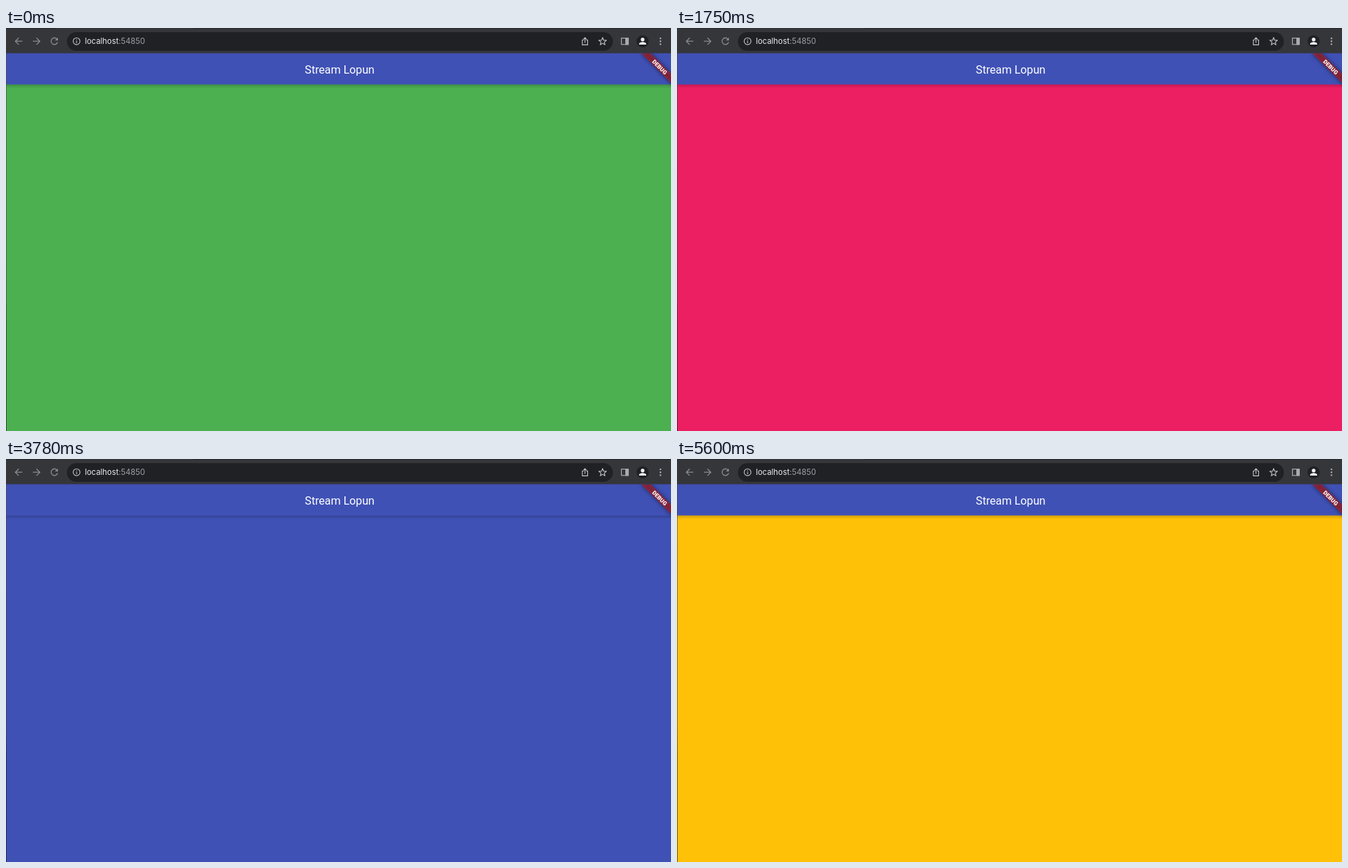
Write an HTML page that moves like this. It is 961 px wide and 583 px high and loops after 5670 ms.

```html
<!DOCTYPE html>
<html lang="en">
<head>
<meta charset="utf-8">
<title>Color stream</title>
<style>
  html, body { margin: 0; width: 100%; height: 100%; overflow: hidden; background: #35363a; }
  svg { display: block; width: 100vw; height: 100vh; }
  .icon { fill: none; stroke-width: 1.3; }
  .url { font: 11.4px Inter, "Liberation Sans", sans-serif; fill: #9aa0a6; }
  .title { font: 16.2px Roboto, "Liberation Sans", sans-serif; fill: #fff; }
  .debug { font: 900 8.2px Roboto, "Liberation Sans", sans-serif; fill: #fff; text-anchor: middle; }
</style>
</head>
<body>
<svg viewBox="0 0 961 583">
  <defs>
    <linearGradient id="shade" x2="0" y2="1">
      <stop offset="0" stop-color="#000" stop-opacity=".19"/>
      <stop offset=".5" stop-color="#000" stop-opacity=".07"/>
      <stop offset="1" stop-color="#000" stop-opacity="0"/>
    </linearGradient>
    <linearGradient id="edge" x2="0" y2="1">
      <stop offset="0" stop-color="#4c4846"/>
      <stop offset=".65" stop-color="#3c3634"/>
      <stop offset=".72" stop-color="#141416"/>
      <stop offset="1" stop-color="#141416"/>
    </linearGradient>
    <filter id="blur" x="-20%" y="-100%" width="140%" height="300%">
      <feGaussianBlur stdDeviation="3"/>
    </filter>
    <clipPath id="page"><rect y="36.5" width="961" height="547"/></clipPath>
  </defs>

  <!-- Page -->
  <rect id="body" y="81" width="961" height="502"/>
  <rect y="81.7" width="961" height="6" fill="url(#shade)"/>
  <rect y="36" width="961" height="45.7" fill="#3f51b5"/>
  <text class="title" x="431.8" y="65.7">Stream Lopun</text>
  <g clip-path="url(#page)">
    <g transform="translate(964.2 37) rotate(45)">
      <rect x="-32.4" y="22.7" width="64.8" height="9.7" fill="#000" opacity=".5" filter="url(#blur)"/>
      <rect x="-32.4" y="22.7" width="64.8" height="9.7" fill="#b71c1c" fill-opacity=".63"/>
      <text class="debug" x="0" y="30.5">DEBUG</text>
    </g>
  </g>
  <rect y="37" width="1" height="546" fill="url(#edge)" opacity=".6"/>

  <!-- Browser toolbar -->
  <rect width="961" height="36.5" fill="#35363a"/>
  <path d="M0 0H72V1H0ZM270 0H961V1H271Z" fill="#26272a"/>
  <rect x="88" y="6" width="789" height="27" rx="13.5" fill="#202124"/>
  <text class="url" x="114" y="23.2"><tspan fill="#e8eaed">localhost</tspan>:54850</text>

  <g transform="translate(0 -.3)">
    <g class="icon" stroke="#898b8f">
      <path d="M23.6 19.5H13.6M18.4 14.6L13.5 19.5L18.4 24.4"/>
      <path d="M38.8 19.5H48.8M44 14.6L48.9 19.5L44 24.4"/>
      <path d="M73.6 16.2A4.8 4.8 0 1 0 74.6 20.6"/>
      <path d="M75 14V18.3H70.7Z" fill="#898b8f" stroke="none"/>
    </g>
    <g class="icon" stroke="#c4c7ca" stroke-linejoin="round">
      <g style="stroke-width: 1.1">
        <circle cx="102" cy="19.5" r="4.9"/>
        <path d="M102 18.7V22.2M102 16.6V17.8"/>
        <path d="M834.6 17.7H832.9V24.7H840.5V17.7H838.8M836.7 21.8V14.4M834.4 16.6L836.7 14.3L839 16.6"/>
        <path id="star"/>
      </g>
    </g>
    <rect x="889.4" y="14.9" width="9.8" height="9.2" fill="none" stroke="#a9abae" stroke-width="1.2"/>
    <rect x="895" y="14.4" width="4.8" height="10.2" fill="#a9abae"/>
    <circle cx="920" cy="19.5" r="8.8" fill="#202124"/>
    <circle cx="920" cy="17" r="2.6" fill="#f1f3f4"/>
    <path d="M914.9 24.4V23.2C914.9 21.4 918 20.5 920 20.5S925.1 21.4 925.1 23.2V24.4Z" fill="#f1f3f4"/>
    <g fill="#a9abae">
      <circle cx="945.8" cy="15.3" r="1.2"/>
      <circle cx="945.8" cy="19.5" r="1.2"/>
      <circle cx="945.8" cy="23.7" r="1.2"/>
    </g>
  </g>
</svg>
<script>
const LOOP = 5670;
const FIRST_CHANGE = 700;
const INTERVAL = 1050;
const COLORS = ["#4caf50", "#ff9a02", "#ec1f62", "#3f51b5", "#607d8b", "#ffc107"];
const body = document.getElementById("body");

function starPath(cx, cy, outer, inner) {
  const points = Array.from({ length: 10 }, (_, i) => {
    const radius = i % 2 ? inner : outer;
    const angle = (i * 36 - 90) * Math.PI / 180;
    return `${cx + radius * Math.cos(angle)} ${cy + radius * Math.sin(angle)}`;
  });
  return `M${points.join("L")}Z`;
}

function render(time) {
  const step = Math.floor((time - FIRST_CHANGE) / INTERVAL) + 1;
  body.setAttribute("fill", COLORS[step]);
}

document.getElementById("star").setAttribute("d", starPath(862.2, 19.9, 5.8, 2.5));
render(0);
const start = performance.now();
function tick() {
  render((performance.now() - start) % LOOP);
  requestAnimationFrame(tick);
}
requestAnimationFrame(tick);
</script>
</body>
</html>
```
